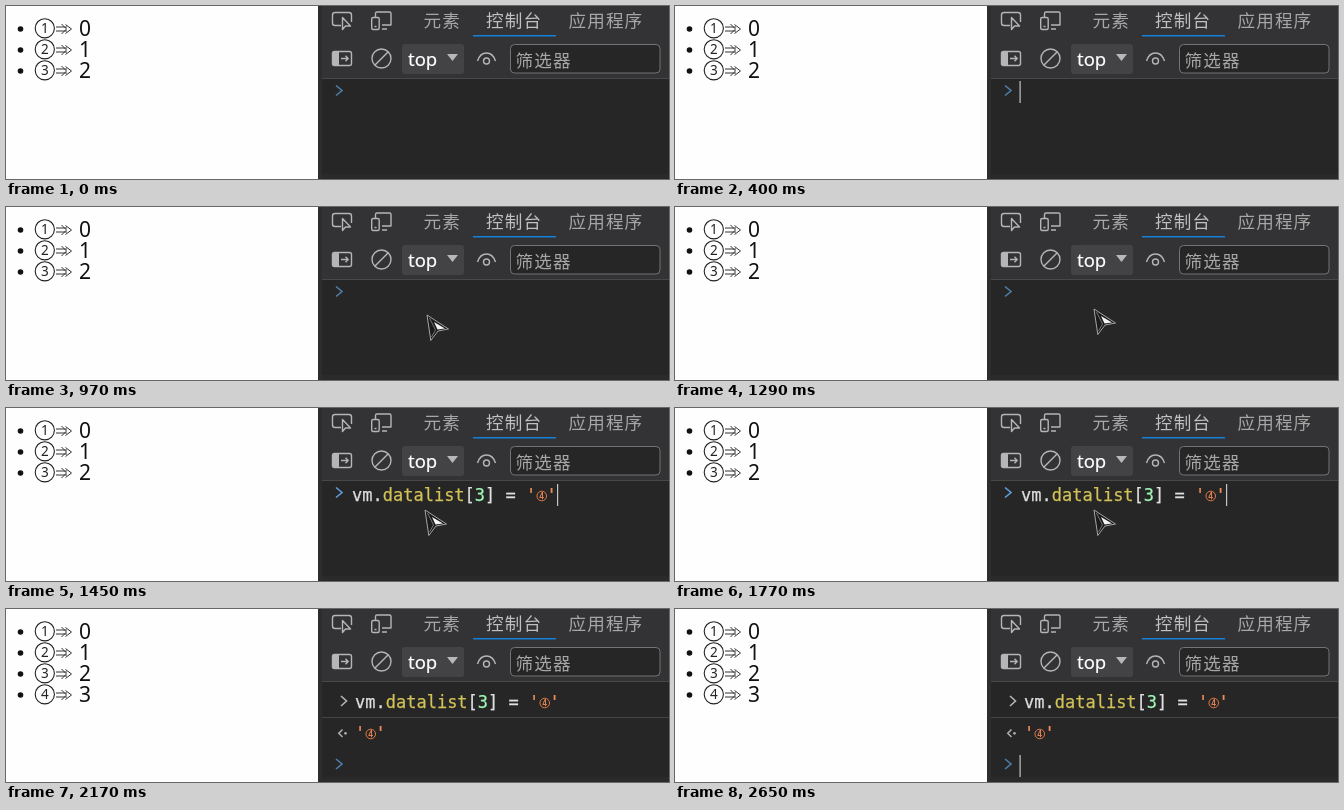
These frames come from a looping animation (663x173 px, 3.29 s). An HTML page:

```html
<!DOCTYPE html>
<html lang="zh-CN">
<head>
<meta charset="utf-8">
<title>Console demo</title>
<style>
  html, body { margin: 0; width: 100%; height: 100%; overflow: hidden; background: #fefefe; }
  svg { display: block; width: 663px; height: 173px; }
  .ui { font: 300 17.6px "Noto Sans CJK SC", "Noto Sans CJK", "Noto Sans", sans-serif; letter-spacing: 1.1px; fill: #a6a6a6; }
  .item { font: 21px "Noto Sans", sans-serif; fill: #111; }
  .code { font: 17px "DejaVu Sans Mono", monospace; fill: #e0e0e0; stroke: currentColor; stroke-width: .25; white-space: pre; color: #e0e0e0; }
  .prop { fill: #d3c257; color: #d3c257; stroke: #d3c257; }
  .num { fill: #a1f7b5; color: #a1f7b5; stroke: #a1f7b5; }
  .str { fill: #f08d5c; color: #f08d5c; stroke: #f08d5c; }
  .icon { fill: none; stroke: #b5b5b5; stroke-width: 1.4; stroke-linejoin: round; }
  .line { fill: none; stroke-width: 1.6; }
</style>
</head>
<body>
<svg viewBox="0 0 663 173" xmlns="http://www.w3.org/2000/svg">
  <g id="list"></g>

  <rect x="312" width="351" height="173" fill="#333335"/>
  <rect x="312" width="4" height="173" fill="#2d2d2f"/>
  <rect x="316" y="73" width="347" height="95" fill="#262626"/>
  <path d="M316 72.5H663" stroke="#484848"/>
  <rect x="316" y="168" width="347" height="5" fill="#2a2a2a"/>

  <g class="icon">
    <path d="M335 19.500H329Q326.500 19.500 326.500 17V9Q326.500 6.500 329 6.500H343Q345.500 6.500 345.500 9V16"/>
    <path d="M336.500 11.500V23.500L339.500 20H344.500Z"/>
    <path d="M369.500 11V7.500Q369.500 6 371 6H383.500Q385 6 385 7.500V19H376M376 23H381"/>
    <rect x="365.700" y="11.500" width="7.500" height="12" rx="1.500"/>
    <path d="M368.500 20.500H370.500"/>
    <rect x="326.500" y="45.500" width="19" height="14" rx="2"/>
    <path d="M335 52.500H342M339.500 49.800L342.200 52.500L339.500 55.200"/>
    <circle cx="375.500" cy="52.500" r="9.500"/>
    <path d="M369 59L382 46"/>
    <path d="M471.500 55Q474 47 480.500 47T489.500 55"/>
    <circle cx="480.500" cy="55" r="3"/>
  </g>
  <rect x="327" y="46" width="6" height="13" fill="#b5b5b5"/>

  <g class="ui">
    <text x="417.500" y="21">元素</text>
    <text x="480" y="21" fill="#c0c0c0">控制台</text>
    <text x="562.500" y="21">应用程序</text>
  </g>
  <rect x="467" y="29" width="83" height="1.500" fill="#1480d8"/>
  <rect x="396" y="38" width="62" height="30" rx="3" fill="#434345"/>
  <text x="402" y="60" font-family="Noto Sans, sans-serif" font-size="18.500" fill="#fff" stroke="#fff" stroke-width=".2">top</text>
  <path d="M441 48H452L446.500 55Z" fill="#b8b8b8"/>
  <rect x="504.500" y="38.500" width="149.500" height="28.500" rx="4" fill="#262626" stroke="#737373"/>
  <text class="ui" x="509.500" y="60.500">筛选器</text>

  <g id="typed"></g>
  <g id="sent"></g>
  <g id="answer">
    <path d="M316 108.500H663" stroke="#454545"/>
    <path class="line" d="M336.500 120.500L332.800 124.300L336.500 128" stroke="#aaa"/>
    <circle cx="339.500" cy="124.300" r="1.400" fill="#aaa"/>
  </g>
  <path id="prompt" class="line" d="M330 79.500L336 84.500L330 89.500"/>
  <rect id="caret" width="1.200" height="22" fill="#c4c4c4"/>
  <g id="mouse" stroke-linejoin="round">
    <path d="M0 0L21.500 14L11 16L3.800 25.500Z" fill="#1b1b1b" stroke="#b4b4b4" stroke-width=".9"/>
    <path d="M2.500 3L8.500 15L4.500 22" fill="none" stroke="#8c8c8c" stroke-width=".8"/>
    <path d="M7 7L18 13.500L10.500 14.500Z" fill="#f4f4f4"/>
  </g>
</svg>
<script>
  const LOOP = 3290;
  const $ = id => document.getElementById(id);

  const listItem = n => {
    const y = 23 + 21 * (n - 1);
    return `<g id="item${n}" transform="translate(0 ${y})">
      <circle cx="14.500" r="2.800" fill="#111"/>
      <circle cx="38.800" cy="-.7" r="9.600" fill="none" stroke="#222" stroke-width="1.100"/>
      <text x="38.800" y="4.200" text-anchor="middle" font-family="Noto Sans, sans-serif" font-size="13.500" fill="#222">${n}</text>
      <path d="M50 -2H61M50 2H61M55.500 -5L60.500 0L55.500 5M59.500 -4.500L65.500 0L59.500 4.500" fill="none" stroke="#333"/>
      <text class="item" x="73" y="7">${n - 1}</text>
    </g>`;
  };
  $('list').innerHTML = [1, 2, 3, 4].map(listItem).join('');

  const ADV = 10.235;
  const quoted = (x, y) => `<g class="code">
    <text class="str" x="${x}" y="${y}">'</text>
    <circle cx="${x + ADV * 1.5 + .4}" cy="${y - 5}" r="4.800" fill="none" stroke="#e07845" stroke-width="1"/>
    <text class="str" x="${x + ADV * 1.5 + .4}" y="${y - 2}" text-anchor="middle" style="font-size:8px">4</text>
    <text class="str" x="${x + ADV * 2}" y="${y}">'</text></g>`;
  const command = (x, y) => `<text class="code" x="${x}" y="${y}">vm.<tspan class="prop">datalist</tspan>[<tspan
    class="num">3</tspan>] = </text>` + quoted(x + ADV * 17, y);

  $('typed').innerHTML = command(346, 93);
  $('sent').innerHTML = '<path class="line" d="M335 87L340.500 92L335 97" stroke="#b5b5b5"/>' + command(349, 99);
  $('answer').innerHTML += quoted(349, 130);

  // Each row: start time, then value
  const caret = [[0, null], [400, [344.5, 75]], [970, null], [1450, [551, 76]],
    [1930, [344.5, 113]], [2010, [344.5, 146]], [2170, null], [2650, [344.5, 146]]];
  const mouse = [[0, null], [480, [424, 114]], [560, [421, 108]], [1130, [420, 106]],
    [1210, [420, 104]], [1290, [419, 102]], [2090, null]];
  const promptY = [[0, 0], [1930, 37.5], [2010, 70.5]];

  const at = (steps, t) => steps.filter(s => s[0] <= t).pop()[1];
  const show = (id, on) => $(id).style.display = on ? '' : 'none';
  const place = (id, pos) => {
    show(id, pos);
    if (pos) $(id).setAttribute('transform', `translate(${pos})`);
  };

  const start = performance.now();
  function draw() {
    const t = (performance.now() - start) % LOOP;
    const typing = t >= 1450 && t < 1930;
    place('caret', at(caret, t));
    place('mouse', at(mouse, t));
    place('prompt', [0, at(promptY, t)]);
    $('prompt').setAttribute('stroke', typing ? '#609fdc' : '#4f7ea8');
    show('typed', typing);
    show('sent', t >= 1930);
    show('item4', t >= 1930);
    show('answer', t >= 2010);
    requestAnimationFrame(draw);
  }
  draw();
</script>
</body>
</html>
```
